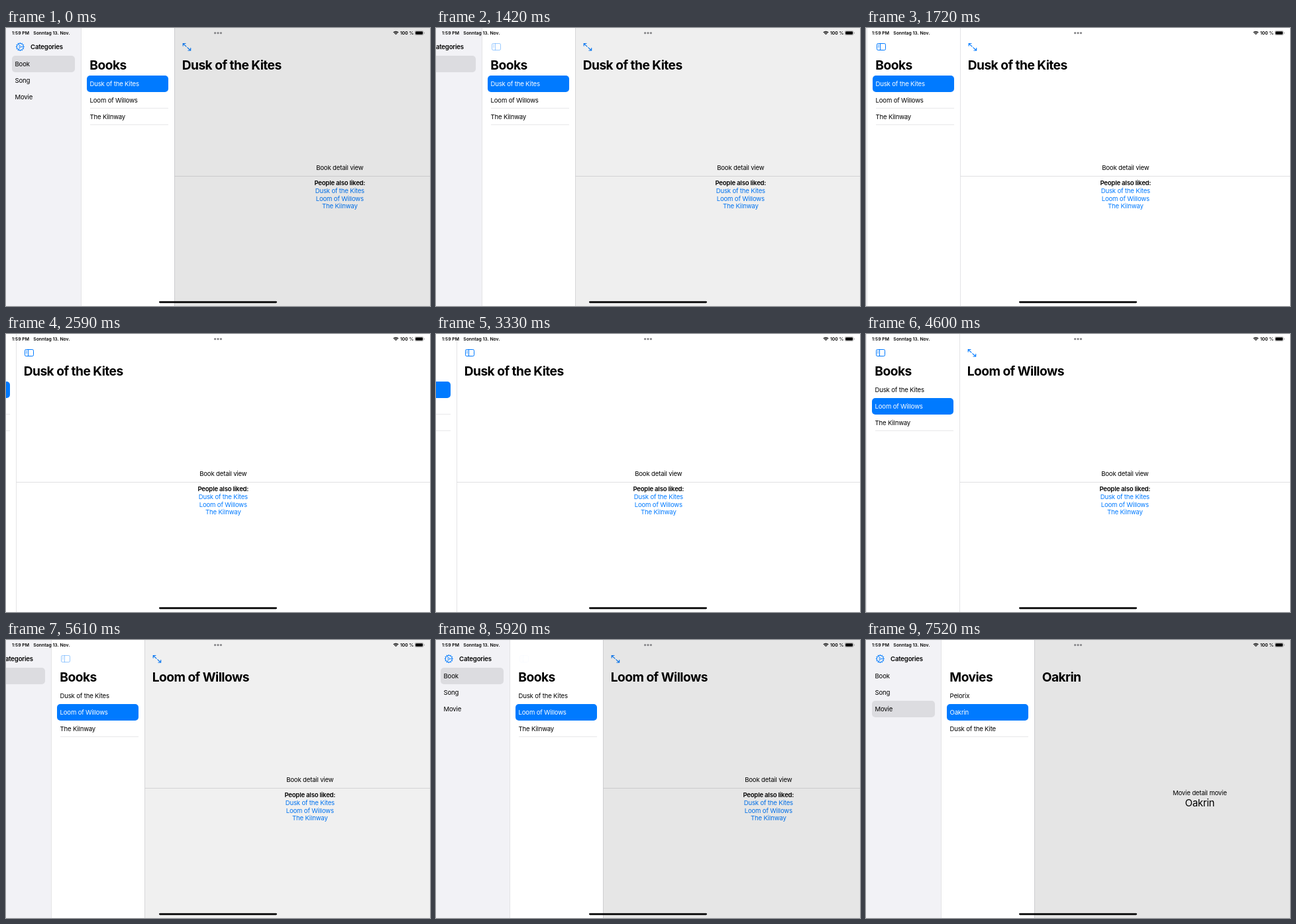
Animation, 640 px wide and 421 px high, one loop 8000 ms. Source, as an HTML page with a canvas:

```html
<!DOCTYPE html>
<html lang="en">
<head>
<meta charset="utf-8">
<title>Split view</title>
<style>
  html, body { margin: 0; width: 100%; height: 100%; overflow: hidden; background: #fff; }
  canvas { display: block; width: 640px; height: 421px; }
</style>
</head>
<body>
<canvas id="stage" width="640" height="421"></canvas>
<script>
const ctx = document.getElementById('stage').getContext('2d');
const W = 640, H = 421, LOOP = 8000;
const SIDEBAR = 113, LIST = 141;
const BLUE = '#007aff', LINE = '#e4e4e6', BODY = 9.6, ROW = 24.8;

const books = ['Dusk of the Kites', 'Loom of Willows', 'The Kilnway'];
const movies = ['Pelorix', 'Oakrin', 'Dusk of the Kite'];

// Each slide moves the list column between two x positions in a few held steps.
const slides = [
  { start: 1420, end: 1880, steps: 7, from: SIDEBAR, to: 0, rate: 17.7 },
  { start: 2380, end: 2880, steps: 8, from: 0, to: -LIST, rate: 13.3 },
  { start: 3330, end: 3940, steps: 9, from: -LIST, to: 0, rate: 11.6 },
  { start: 5530, end: 6060, steps: 8, from: 0, to: SIDEBAR, rate: 13.3 }
];

const clamp = v => Math.max(0, Math.min(1, v));

function listX(t) {
  let x = SIDEBAR;
  for (const s of slides) {
    if (t < s.start) break;
    const step = (s.end - s.start) / (s.steps - 1);
    const k = Math.floor((t - s.start + 8) / step);
    const wt = s.rate * (k + 1) * step / 1000;
    const rest = k >= s.steps - 1 ? 0 : (1 + wt) * Math.exp(-wt);
    x = s.to + (s.from - s.to) * rest;
  }
  return Math.round(x);
}

function text(str, x, y, { size = BODY, weight = 400, color = '#000', align = 'left', track = -0.18 } = {}) {
  ctx.font = `${weight} ${size}px Inter, sans-serif`;
  ctx.letterSpacing = track + 'px';
  ctx.textAlign = align;
  ctx.fillStyle = color;
  ctx.fillText(str, x, y + size * 0.36);
}

const heading = (str, x) => text(str, x, 56.2, { size: 19.2, weight: 700, track: -0.55 });

function rect(x, y, w, h, color) {
  ctx.fillStyle = color;
  ctx.fillRect(x, y, w, h);
}

function pill(x, y, w, h, r, color) {
  ctx.fillStyle = color;
  ctx.beginPath();
  ctx.roundRect(x, y, w, h, r);
  ctx.fill();
}

function outline(x, y, w, h, r, width, color) {
  ctx.lineWidth = width;
  ctx.strokeStyle = color;
  ctx.beginPath();
  ctx.roundRect(x, y, w, h, r);
  ctx.stroke();
}

function stroke(width, color, ...lines) {
  ctx.lineWidth = width;
  ctx.strokeStyle = color;
  ctx.beginPath();
  for (const [first, ...rest] of lines) {
    ctx.moveTo(...first);
    rest.forEach(p => ctx.lineTo(...p));
  }
  ctx.stroke();
}

function ring(x, y, r, width, color, a0 = 0, a1 = Math.PI * 2) {
  ctx.lineWidth = width;
  ctx.strokeStyle = color;
  ctx.beginPath();
  ctx.arc(x, y, r, a0, a1);
  ctx.stroke();
}

function faded(alpha, draw) {
  if (alpha <= 0) return;
  ctx.save();
  ctx.globalAlpha = clamp(alpha);
  draw();
  ctx.restore();
}

function gearIcon(x, y) {
  const polar = (r, a) => [x + r * Math.cos(a), y + r * Math.sin(a)];
  ring(x, y, 5, 1, BLUE);
  ring(x, y, 1.4, 0.8, BLUE);
  for (let i = 0; i < 12; i++) {
    const a = i * Math.PI / 6;
    stroke(1.2, BLUE, [polar(5, a), polar(6.5, a)]);
  }
  for (let i = 0; i < 3; i++) {
    const a = i * Math.PI * 2 / 3;
    stroke(0.8, BLUE, [polar(1.5, a), polar(5, a)]);
  }
}

function sidebarIcon(x) {
  outline(x + 0.5, 23.5, 13, 10, 1.8, 1, BLUE);
  stroke(1, BLUE, [[x + 5.5, 23.5], [x + 5.5, 33.5]]);
  stroke(0.7, BLUE, ...[25.7, 27.4, 29.1].map(y => [[x + 2, y], [x + 4, y]]));
}

function expandIcon(x) {
  stroke(1.1, BLUE,
    [[x, 23.5], [x + 5.2, 28.4]], [[x, 27.5], [x, 23.5], [x + 4.2, 23.5]],
    [[x + 6.3, 29.3], [x + 11.5, 34]], [[x + 11.5, 30], [x + 11.5, 34], [x + 7.3, 34]]);
}

const rowPill = (x, y, w, color) => pill(x, Math.round(y - 12.5), w, 25, 5, color);

function drawSidebar(x, selected) {
  rect(x, 0, SIDEBAR, H, '#f2f2f6');
  gearIcon(x + 21.3, 28.5);
  text('Categories', x + 37, 28.5, { weight: 600 });
  ['Book', 'Song', 'Movie'].forEach((name, i) => {
    const y = 54.9 + i * ROW;
    if (i === selected) rowPill(x + 9, y, 95, '#dcdce0');
    text(name, x + 13.5, y);
  });
}

function drawList(x, title, items, selected) {
  rect(x, 0, LIST, H, '#fff');
  rect(x, 0, 1, H, LINE);
  heading(title, x + 13.3);
  items.forEach((name, i) => {
    const y = 84.5 + i * ROW, on = i === selected;
    if (on) rowPill(x + 9, y, 123, BLUE);
    else if (i + 1 !== selected) rect(x + 14, Math.round(y + 12), 118, 1, '#e8e8ea');
    text(name, x + 13.5, y, { color: on ? '#fff' : '#000' });
  });
  faded(1 - x / SIDEBAR, () => sidebarIcon(x + 15));
}

function drawDetail(x, isMovie, selected) {
  const width = W - Math.min(x, LIST), mid = x + width / 2 + 0.3;
  rect(x, 0, width, H, '#fff');
  rect(x, 0, 1, H, LINE);
  const centered = (str, y, style) => text(str, mid, y, { align: 'center', ...style });
  if (isMovie) {
    if (selected < 0) return;
    heading(movies[selected], x + 11.7);
    centered('Movie detail movie', 231.3);
    centered(movies[selected], 247, { size: 15, track: -0.3 });
    return;
  }
  heading(books[selected], x + 11.7);
  centered('Book detail view', 211.8);
  rect(x, 224, width, 1, '#e0e0e2');
  centered('People also liked:', 235, { weight: 600, track: -0.22 });
  books.forEach((name, i) => centered(name, 246.6 + i * 11.6, { color: BLUE }));
  const expand = clamp(1 - (LIST - x) / 90);
  faded(expand, () => expandIcon(x + 13.2));
  faded(1 - expand, () => sidebarIcon(x + 13));
}

function drawSystemBars() {
  const small = { size: 6.8, weight: 600, track: 0 };
  text('1:59 PM', 9, 7.6, small);
  text('Sonntag 13. Nov.', 41.3, 7.6, small);
  text('100 %', 595, 7.6, small);
  for (const x of [315.6, 320, 324.4]) pill(x - 1.6, 6, 3.2, 3.2, 1.6, '#858588');
  for (const r of [1, 3, 5]) ring(588.5, 10.3, r, 1.3, '#000', -Math.PI * 0.76, -Math.PI * 0.24);
  outline(617.2, 4.3, 12.8, 6.4, 2, 0.6, '#8a8a8a');
  pill(618.1, 5.2, 11, 4.6, 1.3, '#000');
  pill(630.8, 6.4, 0.8, 2.2, 0.4, '#888');
  pill(231, 413.7, 178, 2.8, 1.4, '#000');
}

function render(t) {
  const x = listX(t), isMovie = t >= 6700;
  const selected = isMovie ? (t >= 7520 ? 1 : -1) : (t >= 4600 ? 1 : 0);
  rect(0, 0, W, H, '#fff');
  drawDetail(x + LIST, isMovie, selected);
  rect(x + LIST, 0, W, H, `rgba(0,0,0,${0.1 * clamp(x / SIDEBAR)})`);
  drawList(x, isMovie ? 'Movies' : 'Books', isMovie ? movies : books, selected);
  if (x > 0) drawSidebar(x - SIDEBAR, isMovie ? 2 : 0);
  drawSystemBars();
}

const begin = performance.now();
function tick() {
  render((performance.now() - begin) % LOOP);
  requestAnimationFrame(tick);
}
tick();
</script>
</body>
</html>
```
